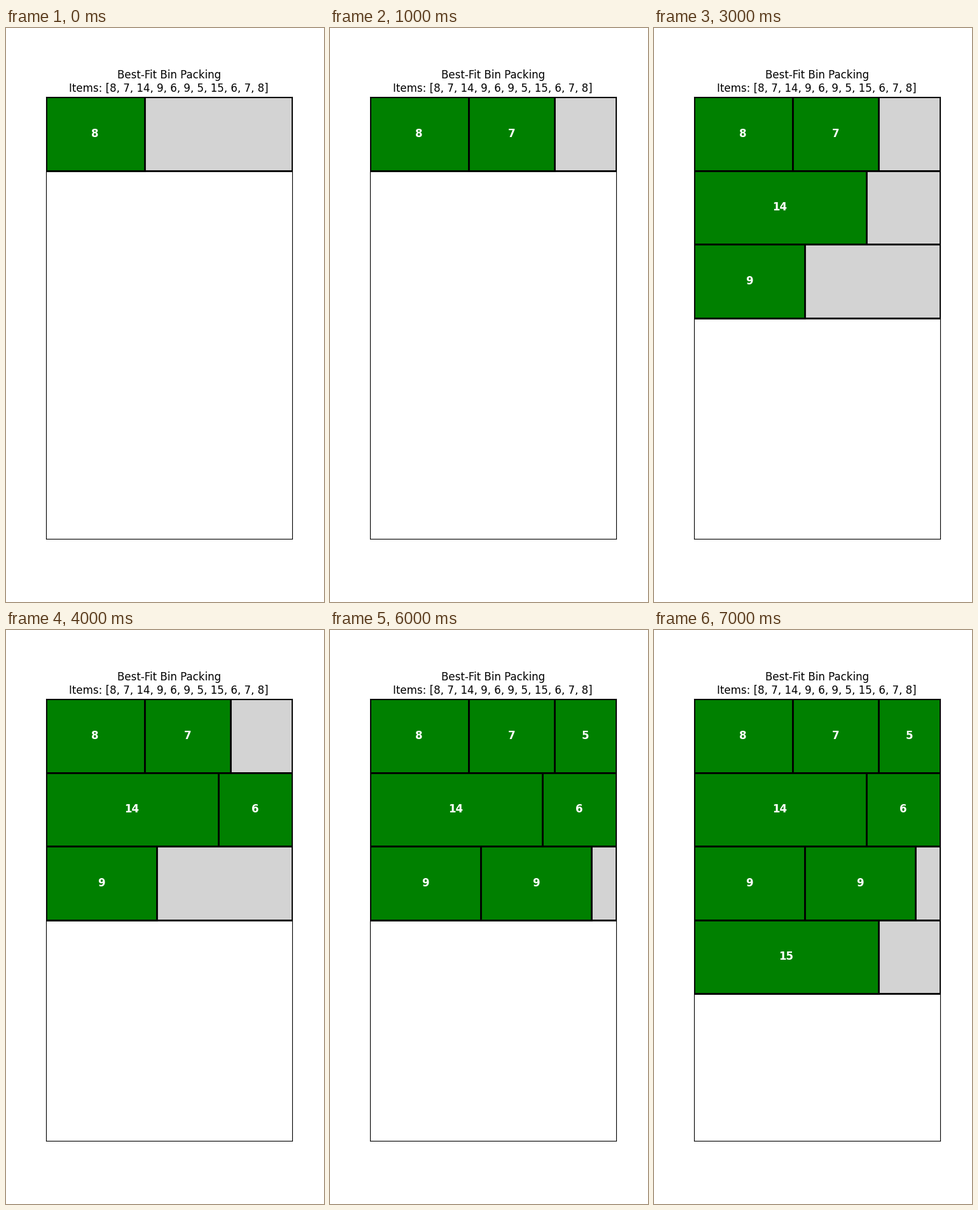
Recreate the animation shown at these times as a matplotlib script. Size 500 px wide and 900 px high, loop 8 s.

```python
import matplotlib.pyplot as plt
from matplotlib.animation import FuncAnimation
from matplotlib.patches import Rectangle

ITEMS = [8, 7, 14, 9, 6, 9, 5, 15, 6, 7, 8]
CAPACITY = 20
ROWS = 6
STEPS = 8

plt.rcParams["font.family"] = "DejaVu Sans"
fig, ax = plt.subplots(figsize=(5, 9), dpi=100)


def best_fit(items):
    """Put each item in the fullest bin that still has room for it."""
    bins = []
    for item in items:
        fitting = [b for b in bins if sum(b) + item <= CAPACITY]
        if fitting:
            max(fitting, key=sum).append(item)
        else:
            bins.append([item])
    return bins


def add_box(x, row, width, color):
    ax.add_patch(Rectangle((x, row), width, 1, facecolor=color,
                           edgecolor="black", linewidth=2))


def draw(step):
    ax.clear()
    ax.set(xlim=(0, CAPACITY), ylim=(ROWS, 0), xticks=[], yticks=[])
    ax.set_title(f"Best-Fit Bin Packing\nItems: {ITEMS}", fontsize=12)
    for row, packed in enumerate(best_fit(ITEMS[:step + 1])):
        add_box(0, row, CAPACITY, "lightgray")
        x = 0
        for item in packed:
            add_box(x, row, item, "green")
            ax.text(x + item / 2, row + 0.5, str(item), color="white",
                    fontsize=12, weight="bold", ha="center", va="center")
            x += item
    return []


anim = FuncAnimation(fig, draw, frames=STEPS, init_func=lambda: draw(0),
                     interval=1000, repeat=True, repeat_delay=0)
plt.show()
```
